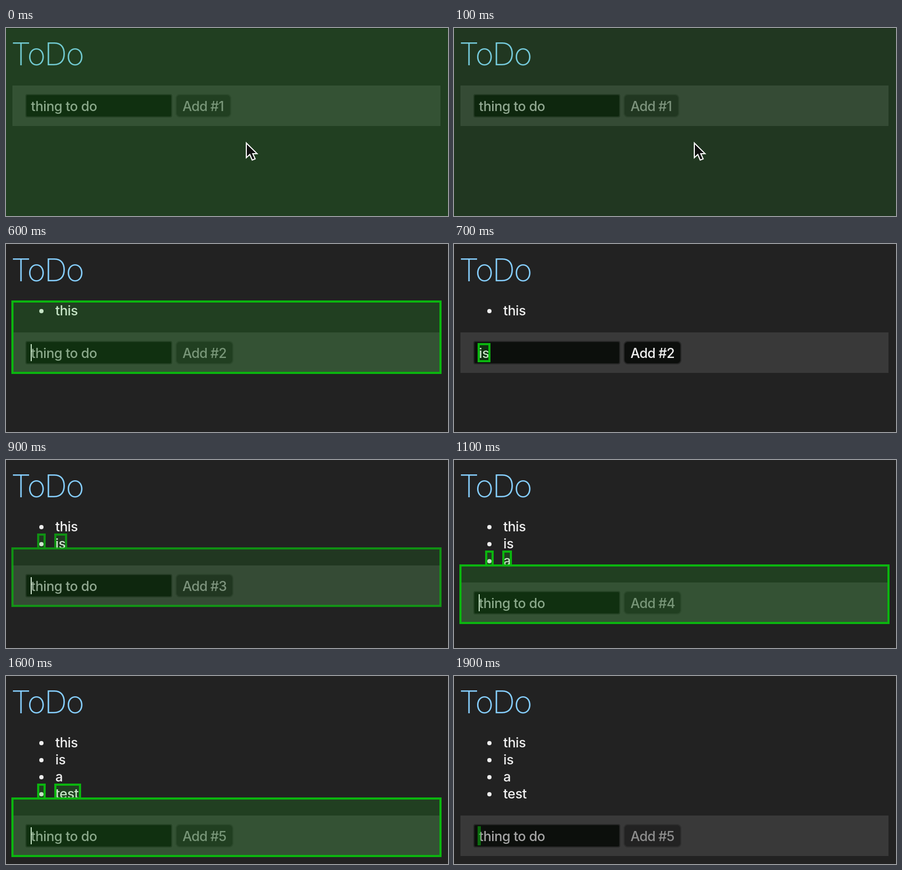
An HTML page for the animation above (2 s loop, 824 by 353 pixels).

```html
<!DOCTYPE html>
<html lang="en">
<head>
<meta charset="utf-8">
<title>ToDo</title>
<style>
  html, body { margin: 0; width: 100%; height: 100%; overflow: hidden; background: #222; }
  svg { display: block; width: 824px; height: 353px; }
  text { font: 450 25px Inter, "Open Sans", sans-serif; letter-spacing: -.4px; fill: #f0f0f0; }
  .title { font-size: 59px; font-weight: 210; letter-spacing: -2.4px; fill: #87d0ff; }
  .hint { fill: #a6a6a6; }
  .button { letter-spacing: -.75px; }
  .off { fill: #8e8e8e; }
</style>
</head>
<body>
<svg id="stage" viewBox="0 0 824 353"></svg>
<script>
const stage = document.getElementById('stage');
const STEP = 100, LOOP = 2000;
const WORDS = ['this', 'is', 'a', 'test'];
const ADVANCE = { t: 9, h: 14, i: 6, s: 13, e: 14, a: 13 };

// One state per step: items added, typed text, flash kind, flash strength
const STATES = [
  [0, '', 'page', 1], [0, '', 'page', .75],
  [0, 't', 'first', 1], [0, 'thi', 'text', 1], [0, 'this', 'text', 1], [0, 'this', 'text', .75],
  [1, '', 'submit', 1], [1, 'is', 'text', 1],
  [2, '', 'submit', 1], [2, '', 'submit', .75], [2, 'a', 'first', 1],
  [3, '', 'submit', 1], [3, 't', 'first', 1], [3, 'tes', 'text', 1], [3, 'test', 'text', 1], [3, 'test', 'text', .75],
  [4, '', 'submit', 1], [4, '', 'submit', .75], [4, '', 'caret', .85], [4, '', 'caret', .55]
];

const rect = (x, y, w, h, attrs) => `<rect x="${x}" y="${y}" width="${w}" height="${h}" ${attrs}/>`;
const label = (x, y, text, cls = '') => `<text x="${x}" y="${y}" class="${cls}">${text}</text>`;
const formTop = n => n ? 134 + 32 * n : 108;
const buttonWidth = n => n ? 106 : 102;
const flashWidth = s => [...s].reduce((sum, c) => sum + ADVANCE[c], 5);

function flashBox(x, y, w, h) {
  return rect(x, y, w, h, 'fill="rgb(30,180,30)" fill-opacity=".2"') +
    rect(x + 2, y + 2, w - 4, h - 4, 'fill="none" stroke="#0bb50f" stroke-width="4"');
}

function list(n) {
  return WORDS.slice(0, n).map((word, i) =>
    `<circle cx="66" cy="${126 + 32 * i}" r="4" fill="#eee"/>` + label(92, 134 + 32 * i, word)).join('');
}

function form(n, typed, caret) {
  const y = formTop(n);
  const button = typed ? 'fill="#0c0e0c" stroke="#272727"' : 'fill="#222" stroke="#2f2f2f"';
  return rect(12, y, 798, 76, 'fill="#393939"') +
    rect(37, y + 17, 272, 42, 'rx="3" fill="#0c0f0c" stroke="#272727" stroke-width="2"') +
    label(46.5, y + 47.5, typed || 'thing to do', typed ? '' : 'hint') +
    (caret ? rect(46, y + 22, 2, 32, 'fill="#eee"') : '') +
    rect(317, y + 17, buttonWidth(n), 42, `rx="7" ${button} stroke-width="2"`) +
    label(329, y + 47.5, 'Add #' + (n + 1), typed ? 'button' : 'button off');
}

function flash(n, typed, kind) {
  const y = formTop(n);
  if (kind === 'page') return flashBox(-4, -4, 832, 361) + rect(0, 0, 824, 1, 'fill="#162d16"');
  if (kind === 'caret') return rect(44, y + 20, 6, 36, 'fill="#0bb50f"');
  if (kind === 'text') return flashBox(44, y + 20, flashWidth(typed), 36);
  if (kind === 'first') {
    return flashBox(44, y + 20, 130, 36) + flashBox(314, y + 14, buttonWidth(n) + 6, 48);
  }
  const top = formTop(n - 1) - 2;
  const item = n > 1
    ? flashBox(58, top - 26, 16, 30) + flashBox(90, top - 26, flashWidth(WORDS[n - 1]), 30)
    : '';
  return item + flashBox(10, top, 802, y + 78 - top);
}

function pointer() {
  return '<path d="M448 216V243.5L454.5 237.5L459 248L464.5 245.7L460 235.9H468Z" ' +
    'fill="#111" stroke="#fff" stroke-width="2"/>';
}

function draw([n, typed, kind, strength]) {
  stage.innerHTML = rect(0, 0, 824, 353, 'fill="#222"') +
    label(9.5, 70, 'ToDo', 'title') + list(n) + form(n, typed, kind === 'submit') +
    `<g opacity="${strength}">${flash(n, typed, kind)}</g>` +
    (kind === 'page' ? pointer() : '');
}

let shown = -1;
const start = performance.now();
function tick() {
  const step = Math.floor((performance.now() - start) % LOOP / STEP);
  if (step !== shown) draw(STATES[shown = step]);
  requestAnimationFrame(tick);
}
tick();
</script>
</body>
</html>
```
